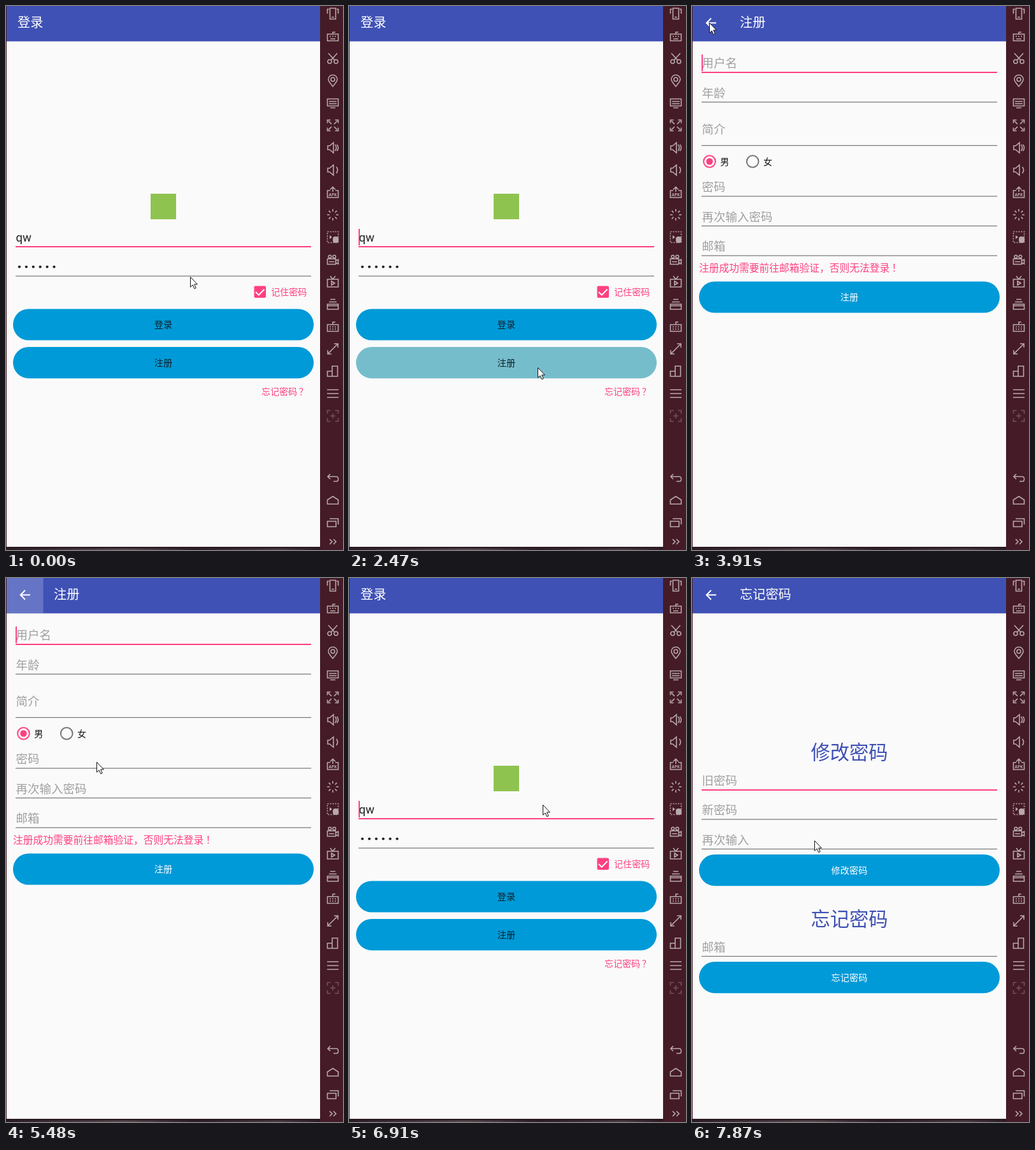
Animation, 529 px wide and 852 px high, one loop 8000 ms. Source, as an HTML page:

```html
<!DOCTYPE html>
<html lang="zh-CN">
<head>
<meta charset="utf-8">
<title>登录</title>
<style>
  html, body { margin: 0; width: 100%; height: 100%; overflow: hidden; background: #441b26; }
  svg { display: block; width: 100%; height: 100%; }
  text { font-family: "Noto Sans CJK SC", "Noto Sans CJK", sans-serif; white-space: pre; }
  .latin { font-family: Roboto, "Noto Sans", sans-serif; }
  .icon { fill: none; stroke: #b9a8ad; stroke-width: 1.6; }
  .apk { fill: #b9a8ad; font: bold 6.5px "Noto Sans", sans-serif; }
</style>
</head>
<body>
<svg viewBox="0 0 529 852" preserveAspectRatio="none">
  <defs>
    <linearGradient id="strip">
      <stop offset="0" stop-color="#2a1a22"/>
      <stop offset=".38" stop-color="#5a4a50"/>
      <stop offset=".6" stop-color="#2b1d25"/>
      <stop offset=".87" stop-color="#4a3a40"/>
      <stop offset="1" stop-color="#2c1a22"/>
    </linearGradient>
    <clipPath id="screen"><rect x="1" width="492" height="847"/></clipPath>
  </defs>
  <rect width="529" height="852" fill="#441b26"/>
  <rect y="847" width="493" height="5" fill="#2a1a22"/>
  <rect y="849.5" width="493" height="2.5" fill="url(#strip)"/>
  <g clip-path="url(#screen)">
    <g id="login"></g>
    <rect id="dim" width="493" height="847"/>
    <g id="register"></g>
    <g id="forgot"></g>
  </g>
  <g id="sidebar"></g>
  <path id="cursor" d="M.5.5V16.2L4.1 12.9 6.7 18.7 9.2 17.6 6.6 11.9H11.4Z" fill="#fff" stroke="#111"/>
</svg>
<script>
const PINK = '#ff4081', INDIGO = '#3f51b5', BLUE = '#009ad8', GREY = '#767676', HINT = '#a0a0a0', INK = '#10212b';
const $ = id => document.getElementById(id);
const range = n => [...Array(n).keys()];

// Text is placed by the vertical centre of its glyphs.
const text = (s, x, cy, size, fill, anchor = 'start') =>
  `<text x="${x}" y="${cy + size * 0.365}" font-size="${size}" fill="${fill}" text-anchor="${anchor}">` +
  s.replace(/[！？]/, c => `<tspan dx=".2em">${c}</tspan>`) + '</text>';
const rect = (x, y, w, h, fill, extra = '') =>
  `<rect x="${x}" y="${y}" width="${w}" height="${h}" fill="${fill}" ${extra}/>`;
const circle = (x, y, r, attrs) => `<circle cx="${x}" cy="${y}" r="${r}" ${attrs}/>`;
const line = (y, active) => active ? rect(15, y - 1, 464, 2, PINK) : rect(15, y - 0.6, 464, 1.2, GREY);
const caret = y => rect(15, y, 2, 26, PINK, 'class="caret"');
const field = (hint, y, active) =>
  text(hint, 15.5, y - 14.5, 18.5, HINT) + line(y, active) + (active ? caret(y - 28) : '');
const heading = (s, cy) => text(s, 247, cy, 30.3, INDIGO, 'middle');
const button = (label, y, color, id = '') =>
  rect(11, y, 472, 49.2, BLUE, `rx="24.6" id="${id}"`) + text(label, 247, y + 24.7, 14.2, color, 'middle');
const radio = (x, label, on) => {
  const color = on ? PINK : GREY;
  return circle(x, 243.5, 9.3, `fill="none" stroke="${color}" stroke-width="2"`) +
    (on ? circle(x, 243.5, 5.2, `fill="${color}"`) : '') + text(label, x + 16.7, 243.5, 14, '#111');
};
const page = (title, back) =>
  rect(1, -2, 492, 849, '#fafafa') + rect(1, -2, 492, 57.4, INDIGO) +
  (back ? rect(1, 0, 57.5, 55, '#fff', 'class="press" opacity="0"') +
    '<path d="M38 26.5H23M30 19.2L22.8 26.5 30 33.8" fill="none" stroke="#fff" stroke-width="2"/>' : '') +
  text(title, back ? 75 : 18, 25.5, 20.2, '#fff');

$('login').innerHTML = page('登录') +
  rect(227, 294, 40, 40, '#8fc350') +
  '<text class="latin" x="15.5" y="368.5" font-size="18.5" fill="#222">qw</text>' +
  line(377, true) + caret(349) +
  range(6).map(i => circle(21 + i * 10.9, 408.5, 2.1, 'fill="#222"')).join('') + line(423) +
  rect(389.5, 438.5, 18.5, 18.5, PINK, 'rx="2"') +
  '<path d="M392 448L396.7 452.7 405.5 443.8" fill="none" stroke="#fff" stroke-width="2"/>' +
  text('记住密码', 416, 448, 14.1, PINK) +
  button('登录', 474.4, INK) + button('注册', 534, INK, 'signup') +
  text('忘记密码？', 401, 604, 14, PINK);

$('register').innerHTML = page('注册', true) +
  field('用户名', 104, true) + field('年龄', 150.5) +
  text('简介', 15.5, 193, 18.5, HINT) + line(218.5) +
  radio(27.5, '男', true) + radio(95.2, '女') +
  field('密码', 298) + field('再次输入密码', 344.5) + field('邮箱', 391) +
  text('注册成功需要前往邮箱验证，否则无法登录！', 11, 410.5, 15.75, PINK) +
  button('注册', 431.4, '#fff');

$('forgot').innerHTML = page('忘记密码', true) +
  heading('修改密码', 273) +
  field('旧密码', 332, true) + field('新密码', 378) + field('再次输入', 424.5) +
  button('修改密码', 433, '#fff') +
  heading('忘记密码', 534) + field('邮箱', 592.5) + button('忘记密码', 601, '#fff');

// Icon strokes, drawn around the origin.
const box = (x, y, w, h) => `M${x} ${y}h${w}v${h}h${-w}z`;
const ring = (x, y, r) => `M${x - r} ${y}a${r} ${r} 0 1 0 ${2 * r} 0a${r} ${r} 0 1 0 ${-2 * r} 0`;
const dash = (x, y, w) => `M${x} ${y}h${w}`;
const corners = f => [-1, 1].map(a => [-1, 1].map(b => f(a, b)).join('')).join('');
const bracket = corners((a, b) => `M${a * 8.5} ${b * 3.5}V${b * 8.5}H${a * 3.5}`);
const speaker = 'M-8-3h3L1-8V8L-5 3h-3z';
const wave = x => `M${x}-5q4 5 0 10`;
const keys = y => [-5, -1, 3].map(x => dash(x, y, 2)).join('');
const rays = range(8).map(i => {
  const c = Math.cos(i * Math.PI / 4), s = Math.sin(i * Math.PI / 4);
  return `M${c * 5} ${s * 5}L${c * 9} ${s * 9}`;
}).join('');

const tools = [
  box(-4.5, -8.5, 9, 17) + dash(-2, 5.5, 4) + 'M-6-7h-2.5v7M6-7h2.5v7',
  box(-8.5, -3, 17, 10.5) + keys(0.5) + dash(-4, 4.5, 8) + 'M0-3v-3h4',
  ring(-5, 5, 3) + ring(5, 5, 3) + 'M-3 3L7-8M3 3L-7-8',
  'M0 9C-4 4-7 1-7-2a7 7 0 0 1 14 0C7 1 4 4 0 9z' + ring(0, -2, 3),
  box(-8.5, -6.5, 17, 11) + dash(-6, -2.5, 12) + dash(-6, 1, 12) + dash(-4, 7.5, 8),
  bracket + corners((a, b) => `M${a * 7} ${b * 7}L${a * 2} ${b * 2}`),
  speaker + wave(3.5) + wave(6.5),
  speaker + wave(5.5),
  'M-4-3h-4.5V8h17V-3H4M0-1v-7M-4-4.5l4-4 4 4',
  rays,
  box(-8.5, -8.5, 17, 17),
  box(-8.5, -1, 13, 8.5) + ring(-4.7, -4.5, 2.3) + ring(2.3, -4.5, 2.3) + dash(-6, 3.5, 8) + 'M4.5 2l4-2v7l-4-2',
  box(-8.5, -4, 17, 12) + 'M-4-9l4 5 4-5M-2-1l5 3-5 3z',
  box(-8.5, 0, 17, 8) + dash(-8.5, 2.5, 17) + dash(-6, -3.5, 12) + dash(-4, -7.5, 8),
  box(-8.5, -3, 17, 10.5) + keys(0.5) + keys(4) + 'M0-3v-4h4',
  'M2-8h6v6M8-8L2-2M-8 2v6h6M-8 8l6-6M-3 3l6-6',
  box(-8.5, 0, 7.5, 8) + box(-1, -8, 8.5, 16),
  [-6, 0, 6].map(y => dash(-9, y, 18)).join(''),
  bracket + 'M-4 0h8M0-4v8'
];
const nav = [
  'M-4-6l-4 4 4 4M-8-2H5q3.5 0 3.5 4T5 5.5H1',
  'M-8.5 6V-.5L0-6l8.5 5.5V6z',
  box(-8.5, -2, 13.5, 8.5) + 'M-5-6H8.5v9',
  [-5, 1].map(x => `M${x}-9l4 4-4 4`).join('')
];
const column = (list, top) => list.map((d, i) =>
  `<path class="icon" transform="translate(513 ${top + i * 35})" d="${d}"/>`).join('');
$('sidebar').innerHTML = column(tools, 12) + column(nav, 739) +
  '<text class="apk" x="513" y="298" text-anchor="middle">APK</text>' +
  '<path d="M508 359l4 3-4 3z" fill="#b9a8ad"/>' + rect(513, 361, 9, 10, '#b9a8ad', 'rx="4"');
const toolIcons = $('sidebar').children;
toolIcons[10].setAttribute('stroke-dasharray', '2 2');
toolIcons[18].setAttribute('opacity', 0.4);

const LOOP = 8000, STEP = 130, BLINK = 520;
const REGISTER = 3190, BACK = 5630, FORGOT = 7320;

// Stops of the mouse: time, x, y.
const stops = [[0, 289, 424], [510, 301, 513], [1950, 300, 519], [2160, 296, 566], [2770, 296, 566],
  [3120, 216, 451], [3510, 246, 347], [3900, 27, 26], [5150, 27, 26], [5460, 142, 288],
  [6380, 450, 608], [6630, 450, 608], [6890, 304, 355], [7200, 304, 355], [7800, 192, 411]];

const within = (t, a, b) => t >= a && t < b;
const blink = (t, half) => Math.floor(t / half) % 2 === 0;

// The recorder picks up the mouse once per STEP.
function mouseAt(time) {
  const t = Math.floor(time / STEP) * STEP;
  const a = stops.filter(s => s[0] <= t).pop();
  const b = stops.find(s => s[0] > t) || a;
  const p = (t - a[0]) / (b[0] - a[0] || 1);
  return [1, 2].map(i => Math.round(a[i] + (b[i] - a[i]) * p));
}

// A new window fades in while growing from 80 %, slowing down, in a few visible steps.
function opening(t, start, end) {
  if (!within(t, start, end)) return 0;
  const x = Math.min(1, 0.28 + Math.floor((t - start) / 150) / 2);
  return 1 - (1 - x) ** 2;
}

function showWindow(id, p) {
  $(id).setAttribute('display', p ? 'inline' : 'none');
  $(id).setAttribute('opacity', p);
  $(id).setAttribute('transform', `translate(247 412) scale(${0.8 + 0.2 * p}) translate(-247 -412)`);
}

function showCaret(id, on) {
  document.querySelector(`#${id} .caret`).setAttribute('visibility', on ? 'inherit' : 'hidden');
}

function draw(t) {
  const register = opening(t, REGISTER, BACK), forgot = opening(t, FORGOT, LOOP);
  showWindow('register', register);
  showWindow('forgot', forgot);
  $('dim').setAttribute('opacity', 0.2 * Math.max(register, forgot));
  showCaret('login', register || blink(t - 390, BLINK));
  showCaret('register', blink(t - REGISTER, 355));
  showCaret('forgot', blink(t - FORGOT, 355));
  $('signup').setAttribute('fill', within(t, 2470, 2780) ? '#76bdcb' : BLUE);
  document.querySelector('#register .press').setAttribute('opacity', t > 5150 ? 0.2 : 0);
  $('cursor').setAttribute('transform', `translate(${mouseAt(t)})`);
}

const begin = performance.now();
function frame() {
  draw((performance.now() - begin) % LOOP);
  requestAnimationFrame(frame);
}
frame();
</script>
</body>
</html>
```
